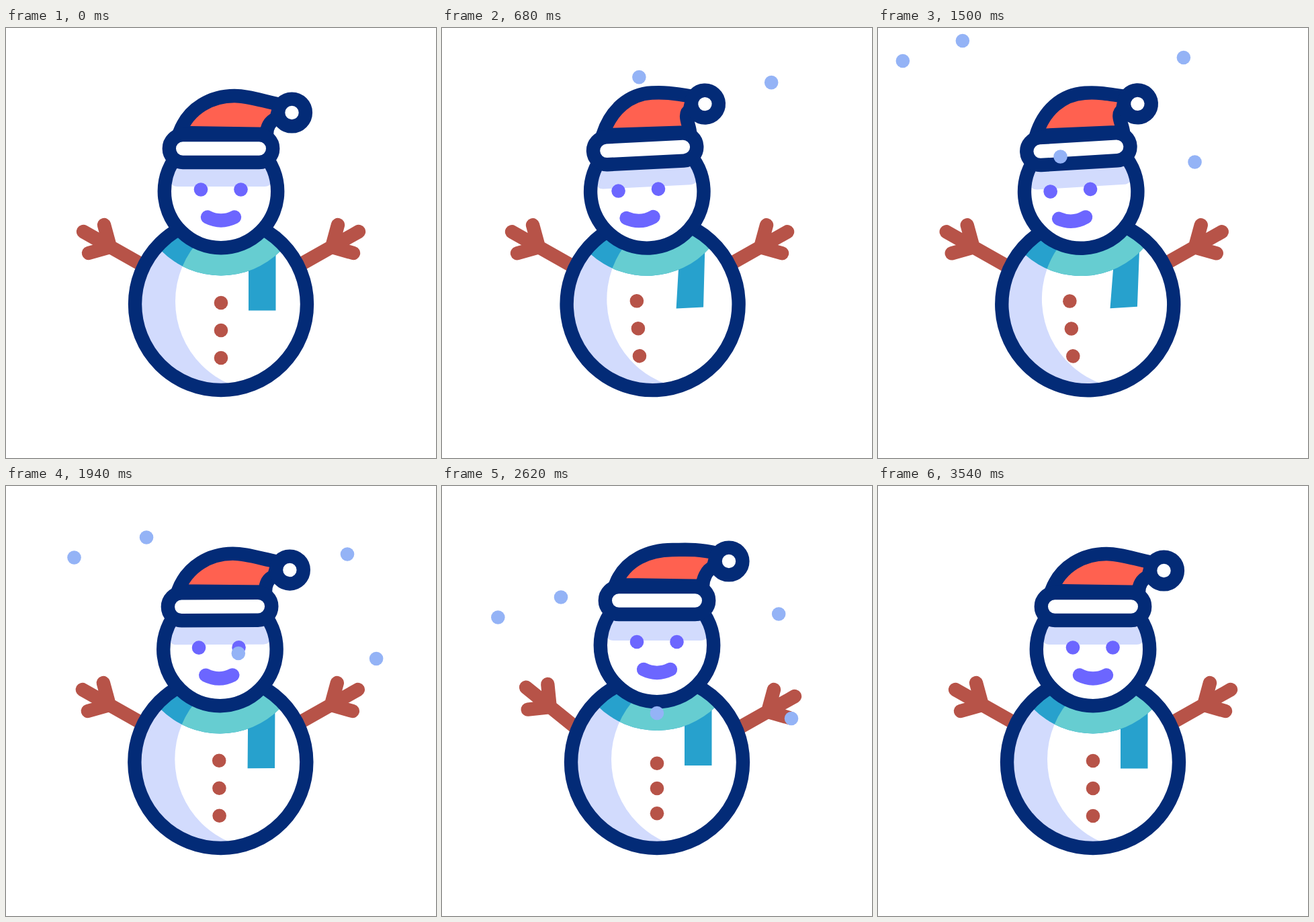
Write an HTML page that moves like this. It is 640 px wide and 640 px high and loops after 3.6 s.

```html
<!DOCTYPE html>
<html lang="en">
<head>
<meta charset="utf-8">
<title>Snowman</title>
<style>
  html, body { margin: 0; width: 100%; height: 100%; overflow: hidden; background: #fff; }
  svg { display: block; width: 100%; height: 100%; }
  .ink { stroke: #032b77; stroke-width: 20.4; stroke-linejoin: round; }
  .shade { fill: #d2dbfd; }
  .blue { fill: #27a1cd; }
  .green { fill: #66cdd1; }
  .brown { fill: #b75348; }
  .violet { fill: #6c66ff; }
  .arm, .mouth { fill: none; stroke-width: 20.4; stroke-linecap: round; stroke-linejoin: round; }
  .arm { stroke: #b75348; }
  .mouth { stroke: #6c66ff; }
  #snow { fill: #94b3f6; }
</style>
</head>
<body>
<svg viewBox="0 0 640 640">
  <defs>
    <clipPath id="bodyClip"><circle cx="320" cy="411" r="122"/></clipPath>
    <clipPath id="litClip"><circle cx="386" cy="407" r="134"/></clipPath>
    <clipPath id="headClip"><circle cx="320" cy="243" r="80"/></clipPath>
    <path id="limb" d="M115 303L230 368M146 293L155 326L123 335"/>
  </defs>

  <g id="arms" class="arm">
    <use id="leftArm" href="#limb"/>
    <use href="#limb" transform="matrix(-1 0 0 1 640 0)"/>
  </g>

  <g id="man">
    <g clip-path="url(#bodyClip)">
      <circle class="shade" cx="320" cy="411" r="122"/>
      <circle fill="#fff" cx="386" cy="407" r="134"/>
      <g id="buttons" class="brown">
        <circle cx="320" cy="409" r="10.3"/>
        <circle cx="320" cy="450" r="10.3"/>
        <circle cx="320" cy="491" r="10.3"/>
      </g>
      <path id="tail" class="blue"/>
      <circle class="blue scarf" cx="320" r="125.5"/>
      <g clip-path="url(#litClip)"><circle class="green scarf" cx="320" r="125.5"/></g>
    </g>
    <circle class="ink" fill="none" cx="320" cy="411" r="128"/>

    <g id="head">
      <circle fill="#fff" cx="320" cy="243" r="84"/>
      <g clip-path="url(#headClip)">
        <rect class="shade" x="243" y="150" width="154" height="86" rx="12"/>
      </g>
      <circle class="ink" fill="none" cx="320" cy="243" r="84.2"/>
    </g>
    <g id="face">
      <circle class="violet" cx="290" cy="240.5" r="10.3"/>
      <circle class="violet" cx="349.5" cy="240.5" r="10.3"/>
      <path class="mouth" d="M300 281.5Q320 291.5 340 281.5"/>
    </g>

    <g id="hat">
      <path id="cone" class="ink" fill="#ff6150"/>
      <circle id="pom" class="ink" fill="#fff" r="20.4"/>
      <rect class="ink" fill="#fff" x="242.8" y="159" width="154.4" height="41" rx="20.4"/>
    </g>
  </g>
  <g id="snow"></g>
</svg>

<script>
const LOOP = 3600, BEAT = 400;
const $ = id => document.getElementById(id);
const set = (el, attrs) => { for (const k in attrs) el.setAttribute(k, attrs[k]); };
const move = (el, x, y) => el.setAttribute('transform', `translate(${x} ${y})`);
const smooth = p => p * p * (3 - 2 * p);
const linear = p => p;

// Interpolate values at the given times, holding both ends.
function track(times, values, t, ease) {
  if (t <= times[0]) return values[0];
  for (let i = 1; i < times.length; i++) {
    if (t < times[i]) {
      const p = (t - times[i - 1]) / (times[i] - times[i - 1]);
      return values[i - 1] + (values[i] - values[i - 1]) * ease(p);
    }
  }
  return values[values.length - 1];
}

// One pose per beat: lean right and left twice, then duck and stretch.
const beats = Array.from({ length: 9 }, (_, i) => i * BEAT);
const pose = (t, right, left, duck, stretch) =>
  track(beats, [0, right, left, right, left, 0, duck, stretch, 0], t, smooth);

const fallTimes = [0, 420, 980, 1500, 1940, 2620, 3540];
const fall = [-42, 29, 124, 191.5, 249, 338, 468];
const swayTimes = [100, 450, 1010, 1570, 2040, 2660, 3000, 3400];
const flakes = [
  { dy: 0, x: [266, 268, 337, 268.6, 356, 319.5, 374, 340] },
  { dy: 8, x: [461, 463, 537, 468.6, 562, 519.5, 578, 540] },
  { dy: -142.5, x: [34, 34, 34, 37, 110, 83, 132, 100] },
  { dy: -172.5, x: [123, 123, 123, 126, 220, 176.5, 228, 196] },
  { dy: -147.5, x: [452, 452, 452, 455, 515, 501, 548, 518] }
];
for (const f of flakes) {
  f.el = document.createElementNS('http://www.w3.org/2000/svg', 'circle');
  f.el.setAttribute('r', 10.3);
  $('snow').append(f.el);
}

function drawHat(t) {
  const px = pose(t, -5, -15.2, 0, 2.6), py = pose(t, -15.6, -7, 10.4, -16.4);
  const tx = pose(t, -6.5, -5.5, 5, 1.5), ty = pose(t, -5.5, -4, 7, 0);
  const tip = (x, y) => `${x + px} ${y + py}`;
  const top = (x, y) => `${x + tx} ${y + ty}`;
  set($('cone'), {
    d: `M258 156C272 118 ${top(307, 101)} ${top(340, 101)}` +
       `C${top(358, 101)} ${tip(376, 107)} ${tip(408, 114)}` +
       `L${tip(402, 135)}C${tip(392, 139)} 388 148 388 158Z`
  });
  set($('pom'), { cx: 425.5 + px, cy: 126 + py });
  move($('hat'), 0, pose(t, 0, 0, 27, -35.6));
}

function drawScarf(t) {
  const y = pose(t, 0, 0, 12, -16.7);
  const dx = pose(t, 17.8, -13, 0, 0);
  const end = 420.5 + y + pose(t, -1.7, -1.5, 0, 0);
  for (const el of document.querySelectorAll('.scarf')) el.setAttribute('cy', 243 + y);
  set($('tail'), {
    d: `M361 ${345 + y}L361 ${360 + y}L${361 + dx} ${end}H${401.5 + dx}L401.5 ${335 + y}V${325 + y}Z`
  });
}

function draw(t) {
  const lean = pose(t, 5, -5, 0, 0);
  set($('man'), { transform: `rotate(${lean} 320 540)` });
  move($('arms'), lean * 3.86, Math.abs(lean) * 0.1 + pose(t, 0, 0, 20, 2.6));
  set($('leftArm'), { transform: `rotate(${pose(t, 0, 0, 8, 10.6)} 200 357)` });

  const squeeze = pose(t, 0, 0, 8, 0.7);
  move($('buttons'), pose(t, 17.4, -34.7, 0, 0), pose(t, -1, -4.9, 0, 0));
  [...$('buttons').children].forEach((b, i) =>
    b.setAttribute('cy', 450 + (i - 1) * (41 - squeeze)));

  move($('head'), 0, pose(t, 0, 0, 20, -25.2));
  move($('face'), pose(t, 23.9, -22.7, 0, 0), pose(t, -2, 0, 25, -33.3));
  drawScarf(t);
  drawHat(t);

  const y = track(fallTimes, fall, t, linear);
  for (const f of flakes) set(f.el, { cx: track(swayTimes, f.x, t, smooth), cy: y + f.dy });
  set($('snow'), { opacity: track([3240, 3540], [1, 0], t, linear) });
}

let start;
function tick(now) {
  start ??= now;
  draw((now - start) % LOOP);
  requestAnimationFrame(tick);
}
draw(0);
requestAnimationFrame(tick);
</script>
</body>
</html>
```
